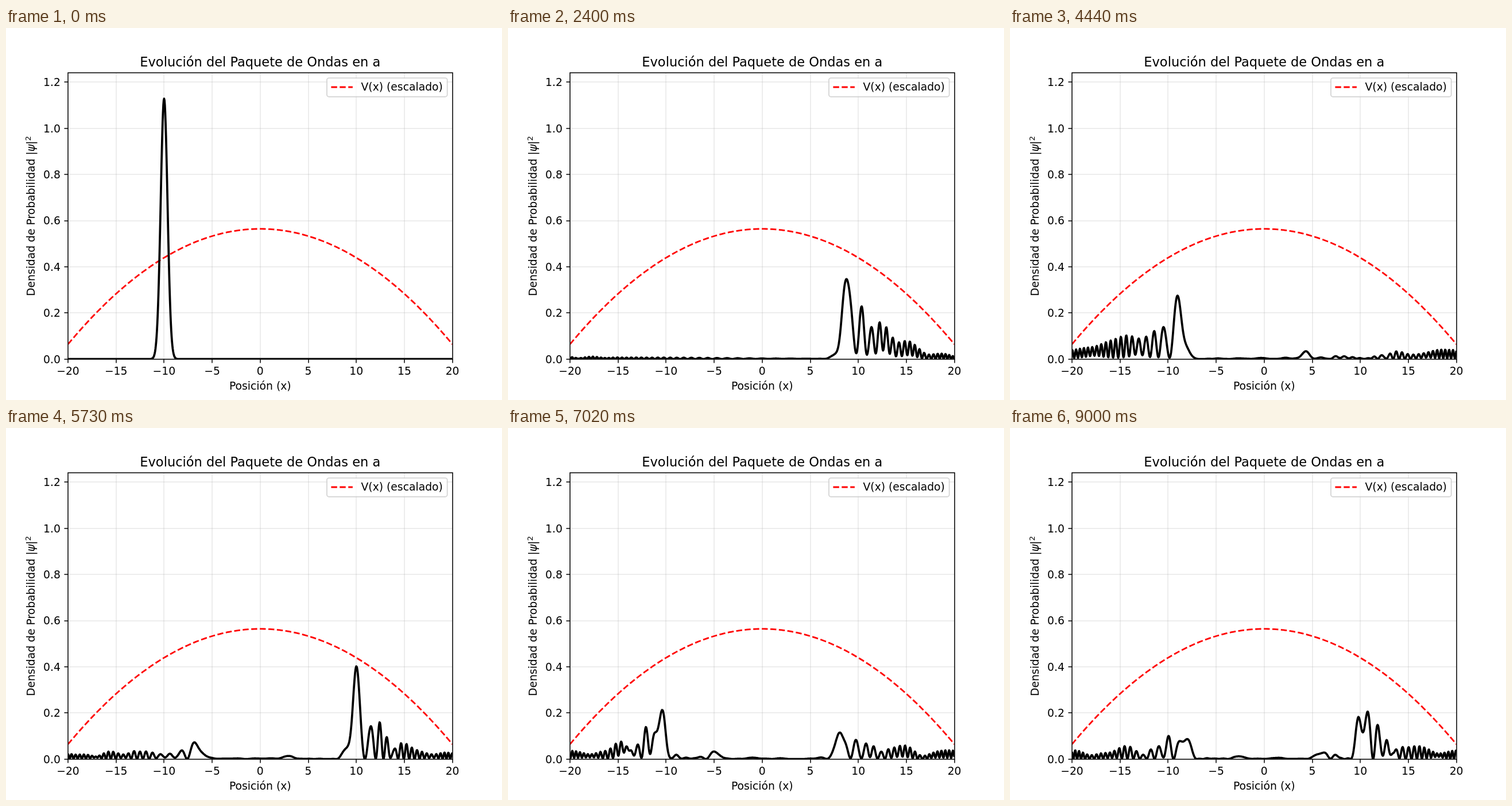
An HTML page that plays this animation: 864x648 px, repeating every 9030 ms.

```html
<!DOCTYPE html>
<html lang="es">
<head>
<meta charset="utf-8">
<style>
  html, body { margin: 0; width: 100%; height: 100%; overflow: hidden; background: #fff; }
  svg { display: block; }
  text { font-family: "DejaVu Sans", sans-serif; font-size: 18.75px; white-space: pre; }
</style>
</head>
<body>
<svg width="864" height="648" viewBox="0 0 864 648">
  <clipPath id="area"><rect x="108" y="77.76" width="669.6" height="498.96"/></clipPath>
  <g id="grid" stroke="#b0b0b0" stroke-opacity=".3" stroke-width="1.5"></g>
  <g clip-path="url(#area)" fill="none" stroke-linejoin="round">
    <path id="potential" stroke="#f00" stroke-width="2.8125" stroke-dasharray="10.41 4.5"/>
    <path id="wave" stroke="#000" stroke-width="3.75"/>
  </g>
  <g id="ticks" stroke="#000" stroke-width="1.5"></g>
  <rect x="108" y="78" width="670" height="499" fill="none" stroke="#000" stroke-width="1.5"/>
  <g id="labels"></g>
  <text x="442.8" y="66.5" text-anchor="middle" style="font-size:22.5px">Evolución del Paquete de Ondas en a</text>
  <text x="442.8" y="629.6" text-anchor="middle">Posición (x)</text>
  <text transform="translate(49.6 467) rotate(-90)">Densidad de Probabilidad |<tspan font-style="italic">ψ</tspan>|<tspan dy="-7" style="font-size:13.1px">2</tspan></text>
  <rect x="558.9" y="87.1" width="209.8" height="32.6" rx="3.75" fill="#fff" fill-opacity=".8" stroke="#ccc" stroke-opacity=".8" stroke-width="1.875"/>
  <path d="M566.4 103H603.9" stroke="#f00" stroke-width="2.8125" stroke-dasharray="10.41 4.5"/>
  <text x="618.5" y="109.3">V(x) (escalado)</text>
</svg>
<script>
const start = performance.now();
const $ = id => document.getElementById(id);
const PEAK = 2 / Math.sqrt(Math.PI);
const px = x => 442.8 + x * 16.74;
const py = d => 576.72 - d * 498.96 / (1.1 * PEAK);

// Axes
const add = (id, markup) => $(id).insertAdjacentHTML('beforeend', markup);
for (let v = -20; v <= 20; v += 5) {
  const x = Math.round(px(v));
  add('grid', `<path d="M${x} 78V577"/>`);
  add('ticks', `<path d="M${x} 577v6.56"/>`);
  add('labels', `<text x="${px(v)}" y="603.6" text-anchor="middle">${String(v).replace('-', '−')}</text>`);
}
for (let i = 0; i <= 6; i++) {
  const y = Math.round(py(i / 5));
  add('grid', `<path d="M108 ${y}H778"/>`);
  add('ticks', `<path d="M108 ${y}h-6.56"/>`);
  add('labels', `<text x="94.9" y="${py(i / 5) + 6.9}" text-anchor="end">${(i / 5).toFixed(1)}</text>`);
}

const curve = (n, f) => 'M' + Array.from({ length: n + 1 }, (_, i) =>
  px(-20 + 40 * i / n).toFixed(2) + ' ' + py(f(i)).toFixed(2)).join('L');
$('potential').setAttribute('d', curve(200, i => PEAK / 2 - 0.5 * (i / 100 - 1) ** 2));

// Schrödinger equation on a periodic interval, V = -0.1 x², split-step Fourier
const N = 1024, DT = 0.02, STEPS = 5, FRAMES = 301;
const table = f => Float64Array.from({ length: N }, (_, i) => f(i));
const xs = table(i => -20 + 40 * i / N);
const packet = trig => table(i => Math.sqrt(PEAK) * Math.exp(-2 * (xs[i] + 10) ** 2) * trig(2 * xs[i]));
const re = packet(Math.cos), im = packet(Math.sin);
const rotor = (angle, scale = 1) => ({
  c: table(i => scale * Math.cos(angle(i))),
  s: table(i => scale * Math.sin(angle(i)))
});
const kick = rotor(i => 0.1 * xs[i] ** 2 * DT / 2);
const drift = rotor(i => -((Math.PI / 20 * (i < N / 2 ? i : i - N)) ** 2) * DT / 2, 1 / N);
const wheel = rotor(i => -2 * Math.PI * i / N);

function turn({ c, s }) {
  for (let i = 0; i < N; i++) {
    const a = re[i], b = im[i];
    re[i] = a * c[i] - b * s[i];
    im[i] = a * s[i] + b * c[i];
  }
}

function fft(a, b) {
  for (let i = 1, j = 0; i < N; i++) {
    let bit = N >> 1;
    for (; j & bit; bit >>= 1) j ^= bit;
    j ^= bit;
    if (i < j) {
      [a[i], a[j]] = [a[j], a[i]];
      [b[i], b[j]] = [b[j], b[i]];
    }
  }
  for (let half = 1; half < N; half *= 2) {
    const stride = N / (2 * half);
    for (let base = 0; base < N; base += 2 * half) {
      for (let k = 0; k < half; k++) {
        const p = base + k, q = p + half, c = wheel.c[k * stride], s = wheel.s[k * stride];
        const u = a[q] * c - b[q] * s, v = a[q] * s + b[q] * c;
        a[q] = a[p] - u; b[q] = b[p] - v;
        a[p] += u; b[p] += v;
      }
    }
  }
}

function step() {
  turn(kick);
  fft(re, im);
  turn(drift);
  fft(im, re); // swapped parts give the inverse transform
  turn(kick);
}

const snapshot = () => curve(N, i => re[i % N] ** 2 + im[i % N] ** 2);
const paths = [snapshot()];

function draw() {
  const index = Math.floor(Math.max(0, performance.now() - start) / 30) % FRAMES;
  while (paths.length <= index) {
    for (let i = 0; i < STEPS; i++) step();
    paths.push(snapshot());
  }
  $('wave').setAttribute('d', paths[index]);
  requestAnimationFrame(draw);
}
draw();
</script>
</body>
</html>
```
